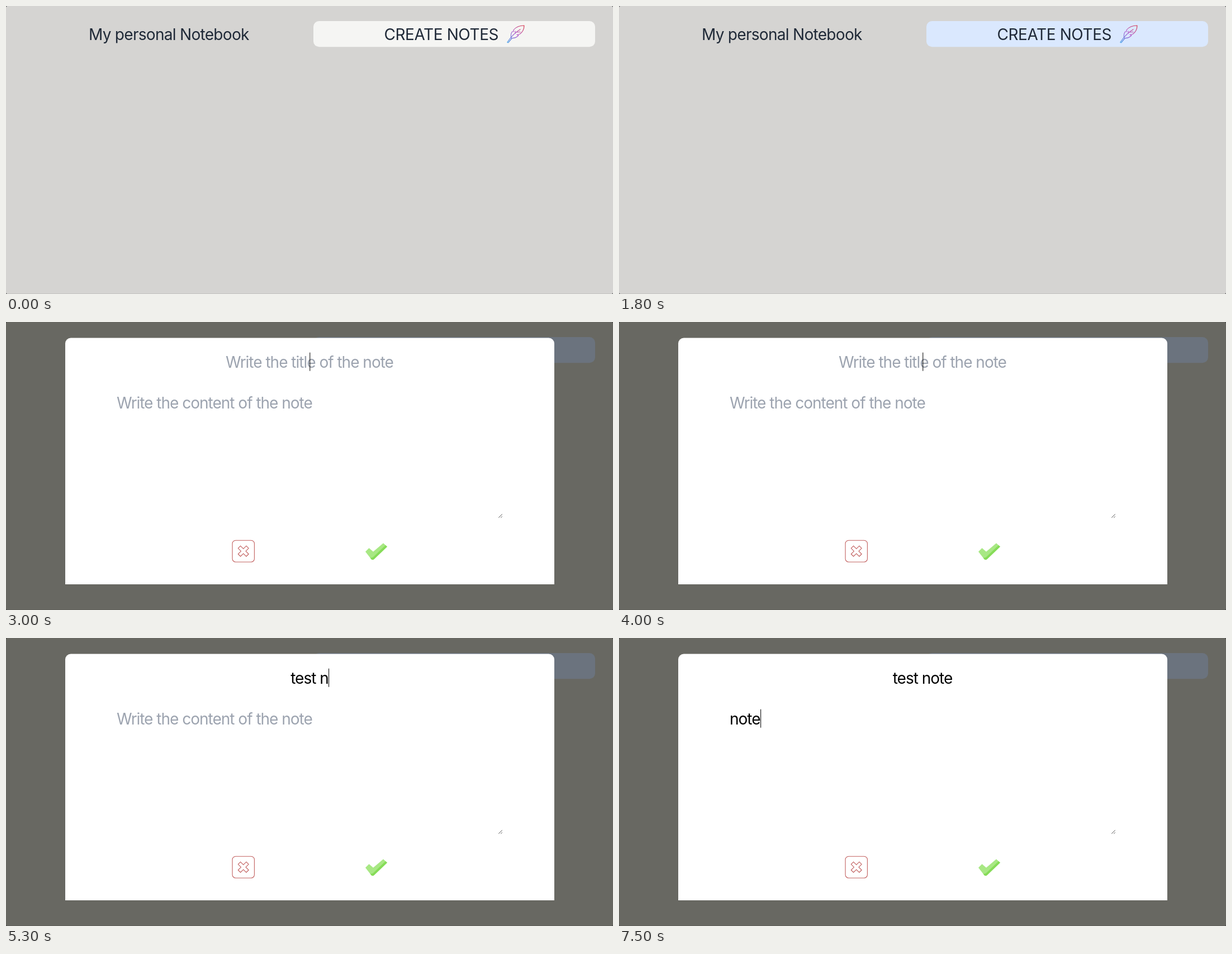
Recreate the animation shown at these times as an HTML page. Size 1086x516 px, loop 8000 ms.

```html
<!DOCTYPE html>
<html lang="en">
<head>
<meta charset="utf-8">
<title>Notebook</title>
<style>
  html, body { margin: 0; width: 100%; height: 100%; overflow: hidden; background: #3c3c3c; }
  svg { display: block; width: 1086px; height: 516px; }
  text {
    font: 28px Inter, "Liberation Sans", sans-serif;
    font-optical-sizing: none;
    letter-spacing: -1px;
    white-space: pre;
  }
  .head { fill: #1f2937; letter-spacing: -.7px; }
  .caps { letter-spacing: -.4px; }
  .mid { text-anchor: middle; }
</style>
</head>
<body>
<svg viewBox="0 0 1086 516">
  <defs>
    <linearGradient id="ink" gradientUnits="userSpaceOnUse" x1="897" y1="66" x2="927" y2="35">
      <stop offset="0" stop-color="#3fa0e8"/>
      <stop offset=".5" stop-color="#b05fd0"/>
      <stop offset="1" stop-color="#d83a4c"/>
    </linearGradient>
  </defs>

  <rect id="page" width="1086" height="516" rx="3"/>
  <rect y="515" x="2" width="1082" height="1" opacity=".08"/>
  <rect id="button" x="550" y="27" width="504" height="46.3" rx="10"/>

  <g id="home">
    <text class="head mid" x="291.3" y="61">My personal Notebook</text>
    <text class="head caps mid" x="778.8" y="61">CREATE NOTES</text>
    <g fill="none" stroke="url(#ink)" stroke-width="1.2" stroke-linejoin="round" stroke-linecap="round">
      <path d="M927 35C919 35 912 38 908 43L908 46L905.500 46C903 50 903 54 904 57.500C909 58 914 56 917 52.500L914 51.500L919 50.500C924 47 927 42 927 35Z"/>
      <path d="M920 42C911 47 903 56 896.800 65C898 66.500 899 65.500 899.500 64.500L905 58M911 49.500L911 45M914 47L920 46.500"/>
    </g>
  </g>

  <g id="dialog">
    <path d="M106 470V38.500a10 10 0 0 1 10-10H971a10 10 0 0 1 10 10V470Z" fill="#fff"/>
    <text id="title" class="mid" x="543" y="82.300"></text>
    <text id="content" x="198" y="154.800"></text>
    <rect id="caret" width="1.100" height="33" fill="#111"/>
    <path d="M881.300 350.700L887.700 344.300M885.300 350.700L887.700 348.300" stroke="#555" stroke-width="1"/>
    <g fill="none" stroke="#c2605f" stroke-width="1.100" stroke-linejoin="round">
      <rect x="405" y="391.200" width="39.400" height="38.800" rx="6"/>
      <path transform="translate(424.700 410.600) rotate(45)"
        d="M-3-10.300H3V-3H10.300V3H3V10.300H-3V3H-10.300V-3H-3Z"/>
    </g>
    <path d="M643 411.500L649.500 405L657 411.500L675 396.300L682 402.500L658.500 425Q656 427 653.500 425Z" fill="#a8e884"/>
    <path d="M679 400L682 402.500L658.500 425Q656 427 653.500 425L651.500 422.300Q655 423 657 421Z" fill="#86dc58"/>
  </g>
</svg>
<script>
  const LOOP = 8000;
  const [page, button, home, dialog, title, content, caret] =
    ["page", "button", "home", "dialog", "title", "content", "caret"].map(id => document.getElementById(id));

  // Each key is [time, text typed so far]
  const titleKeys = [[4400, "t"], [4500, "te"], [4800, "tes"], [5000, "test"],
    [5200, "test "], [5300, "test n"], [5500, "test no"], [5600, "test note"]];
  const contentKeys = [[7000, "n"], [7200, "no"], [7300, "not"], [7500, "note"]];
  const caretSpans = [[3000, 3500], [4000, 6200], [6400, 6900], [7000, LOOP]];

  const typed = (keys, t) => keys.reduce((text, [at, value]) => t >= at ? value : text, "");

  function fill(field, value, placeholder) {
    field.textContent = value || placeholder;
    field.setAttribute("fill", value ? "#000" : "#9ca3af");
    return value ? field.getComputedTextLength() : 0;
  }

  function draw(now) {
    const t = now % LOOP, open = t >= 2000;
    page.setAttribute("fill", open ? "#686862" : "#d5d4d2");
    button.setAttribute("fill", open ? "#6b737e" : t >= 1800 ? "#dae8fe" : "#f5f5f3");
    home.style.display = open ? "none" : "";
    dialog.style.display = open ? "" : "none";

    if (open) {
      const titleWidth = fill(title, typed(titleKeys, t), "Write the title of the note");
      const contentWidth = fill(content, typed(contentKeys, t), "Write the content of the note");
      const inContent = t >= 6400;
      caret.setAttribute("x", inContent ? 198.5 + contentWidth : 543.2 + titleWidth / 2);
      caret.setAttribute("y", inContent ? 127.7 : 54.7);
      caret.style.display = caretSpans.some(([from, to]) => t >= from && t < to) ? "" : "none";
    }
    requestAnimationFrame(() => draw(performance.now()));
  }
  draw(performance.now());
</script>
</body>
</html>
```
